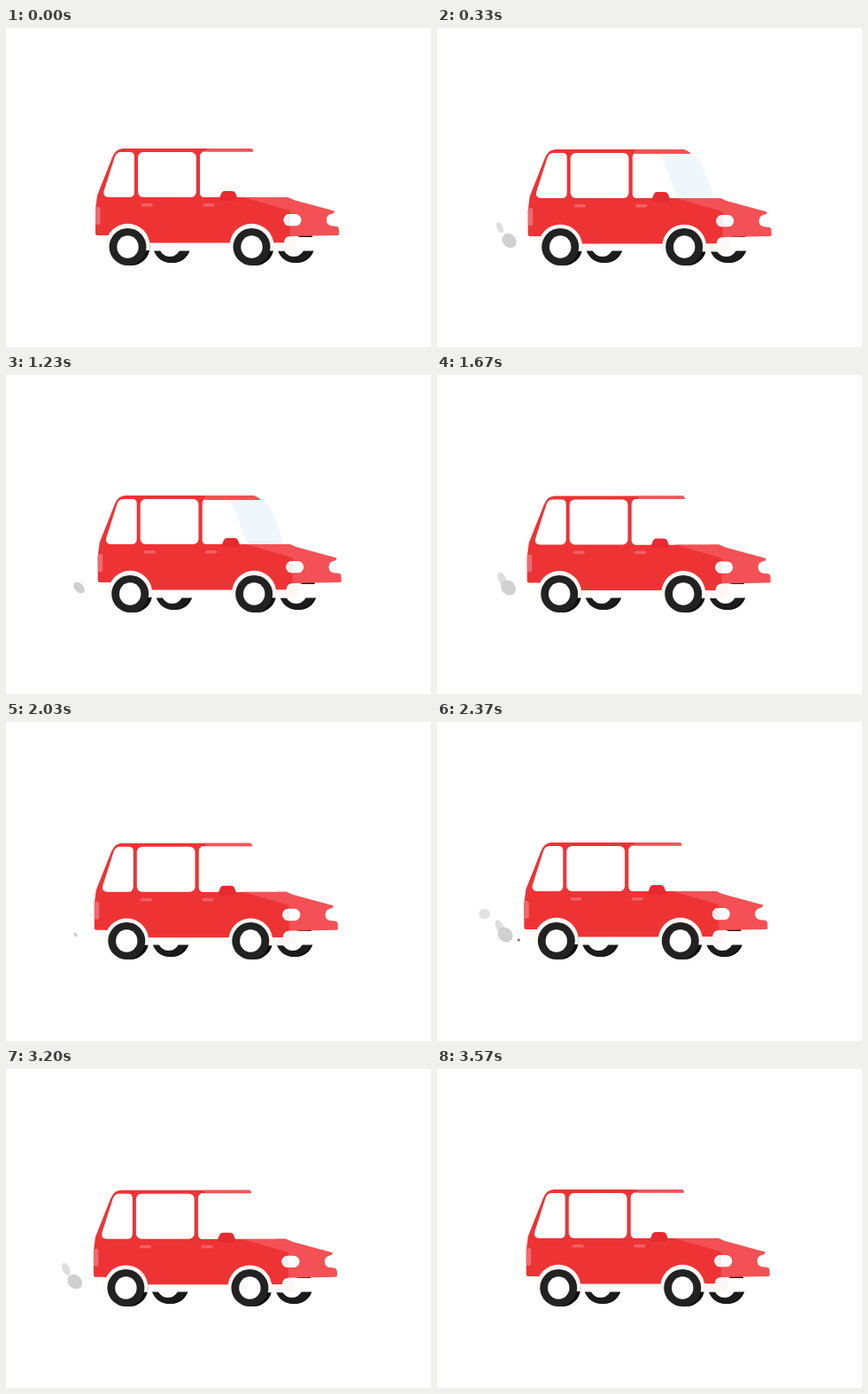
An HTML page that plays this animation: 480 px wide and 360 px high, repeating every 3.61 s.

```html
<!DOCTYPE html>
<html lang="en">
<head>
<meta charset="utf-8">
<title>Red car</title>
<style>
  html, body { margin: 0; width: 100%; height: 100%; overflow: hidden; background: #fff; }
  svg { display: block; width: 100vw; height: 100vh; }
</style>
</head>
<body>
<svg viewBox="0 0 480 360">
  <defs>
    <g id="wheel">
      <circle r="21" fill="#222"/>
      <ellipse rx="12.2" ry="12.7" fill="#fff"/>
    </g>
    <g id="farWheel">
      <circle cx="2.5" r="20" fill="#0b0b0b"/>
      <circle r="20" fill="#1c1c1c"/>
      <circle cx="-1" cy="1" r="12" fill="#fff"/>
    </g>
    <circle id="tread" r="21" fill="#0b0b0b"/>
    <path id="arch" d="M-25 0A25 25.300 0 0 1 25 0V5H-25Z" fill="#fdf8f6"/>
  </defs>

  <g id="smoke">
    <ellipse id="old" fill="#e2e2e2"/>
    <ellipse id="wisp" fill="#dedede"/>
    <ellipse id="puff" fill="#d0d0d0"/>
    <circle id="dot" cx="95" cy="246" r="1.6" fill="#777"/>
  </g>

  <g id="car">
    <use href="#farWheel" x="186" y="245"/>
    <use href="#farWheel" x="326" y="245"/>
    <path d="M160 236H354V251.500H160Z" fill="#fff"/>
    <use href="#tread" x="141.500" y="247"/>
    <use href="#tread" x="281.500" y="247"/>

    <g id="body">
      <!-- side panel with cabin -->
      <path d="M103 234Q101 234 101 231V205L103 189L120 146Q124 136 132 136H277Q279 136.500 279 139.500H222V191H318L330 200L322 235L318 242.500H160L113 234Z" fill="#ee3335"/>
      <path id="roof" d="M225 136H277Q279 136.500 279 139.500H228Z" fill="#f25558"/>

      <!-- windows -->
      <path d="M130 140H140Q145 140 145 145V185Q145 191 139 191H116Q109 191 110.500 184L123 145Q125 140 130 140Z" fill="#fff"/>
      <rect x="149" y="140" width="65.800" height="51" rx="6" fill="#fff"/>
      <path d="M224 140H280L308 191H224Q219 191 219 186V145Q219 140 224 140Z" fill="#fff"/>
      <path id="glass" d="M222 136H276Q282 137 285 141H222Z" fill="#f05255"/>
      <path id="screen" d="M249 141H284Q292 144 296 150L309 183Q310 188 308 191H272Q266 185 263 174Q259 157 249 141Z" fill="#eff7fd"/>

      <!-- bonnet and front -->
      <path d="M268 191H318Q321 192 325 194L371 206.500L370 209Q362 211 362 217Q362 223 374 224Q376 225 376 228V233Q376 234 374 234L321 235V208Q321 206 317 205Z" fill="#f35155"/>
      <rect x="313.500" y="210" width="20" height="13.300" rx="6.500" fill="#fff"/>
      <path d="M320 210H321V223.300H320A6.500 6.650 0 0 1 320 210Z" fill="#f3eeee"/>
      <rect x="362" y="210" width="14" height="13.300" rx="6" fill="#fff"/>

      <!-- details -->
      <rect x="101" y="202" width="5.500" height="20" rx="2.500" fill="#ef6a6f"/>
      <rect x="153" y="198" width="13" height="3.500" rx="1.500" fill="#f26063"/>
      <rect x="222.500" y="198" width="13" height="3.500" rx="1.500" fill="#f26063"/>
      <path d="M241 192L243 187Q244 184 247 184H255Q258 184 259 186L261 191Q261 195 257 195H246Q241 195 241 192Z" fill="#e82a30"/>

      <!-- trim -->
      <path d="M100 234.500H115L112 252H100Z" fill="#fff"/>
      <path d="M298 242.500H314V241Q315 235 321 235H328V246Q328 251.500 322 251.500H298Z" fill="#fdf8f6"/>
      <use href="#arch" x="137.500" y="246"/>
      <use href="#arch" x="277.500" y="246"/>
    </g>

    <use href="#wheel" x="137.500" y="247"/>
    <use href="#wheel" x="277.500" y="247"/>
  </g>
</svg>
<script>
const LOOP = 3610, TAU = Math.PI * 2;
const BOUNCES = 6, PUFFS = 5;
const $ = id => document.getElementById(id);
const clamp = v => Math.max(0, Math.min(1, v));
const mix = (a, b, k) => a + (b - a) * k;
const ease = k => { k = clamp(k); return k * k * (3 - 2 * k); };

function ellipse(id, x, y, rx, ry, turn) {
  const e = $(id);
  e.setAttribute("rx", Math.max(0, rx).toFixed(2));
  e.setAttribute("ry", Math.max(0, ry).toFixed(2));
  e.setAttribute("transform", `translate(${x.toFixed(2)} ${y.toFixed(2)}) rotate(${turn})`);
}

function drawSmoke(p, t) {
  const grow = ease(p / 0.24), thin = ease((p - 0.36) / 0.4);
  const size = grow * (1 - ease((p - 0.72) / 0.16));
  ellipse("puff", mix(93, 79.8, grow), mix(246, 240, grow),
    size * (9.3 - 2 * thin), size * (7.8 - 3 * thin), 45);

  const rise = clamp((p - 0.2) / 0.35);
  const wisp = ease((p - 0.12) / 0.16) * (1 - ease((p - 0.4) / 0.2));
  ellipse("wisp", mix(75.5, 67, rise), mix(234, 222, rise), 4.3 * wisp, 8 * wisp, -25);

  // one late puff lingers behind the car
  const k = clamp((t - 2180) / 380), s = Math.sin(Math.PI * k);
  ellipse("old", mix(60, 53, k), mix(219, 214, k), 6.3 * s, 6 * s, 0);
  $("dot").setAttribute("visibility", t > 2330 && t < 2410 ? "visible" : "hidden");
}

function draw(t) {
  const turn = t / LOOP;
  const dx = 3.2 * Math.sin(TAU * turn);
  const dy = 0.5 - 0.5 * Math.cos(TAU * BOUNCES * turn);
  const shift = `translate(${dx.toFixed(2)} 0)`;
  $("car").setAttribute("transform", shift);
  $("smoke").setAttribute("transform", shift);
  $("body").setAttribute("transform", `translate(0 ${dy.toFixed(2)})`);

  const tinted = t > 300 && t < 1500 ? "visible" : "hidden";
  $("glass").setAttribute("visibility", tinted);
  $("screen").setAttribute("visibility", tinted);

  drawSmoke(turn * PUFFS % 1, t);
}

const start = performance.now();
function tick() {
  draw((performance.now() - start) % LOOP);
  requestAnimationFrame(tick);
}
draw(0);
requestAnimationFrame(tick);
</script>
</body>
</html>
```
